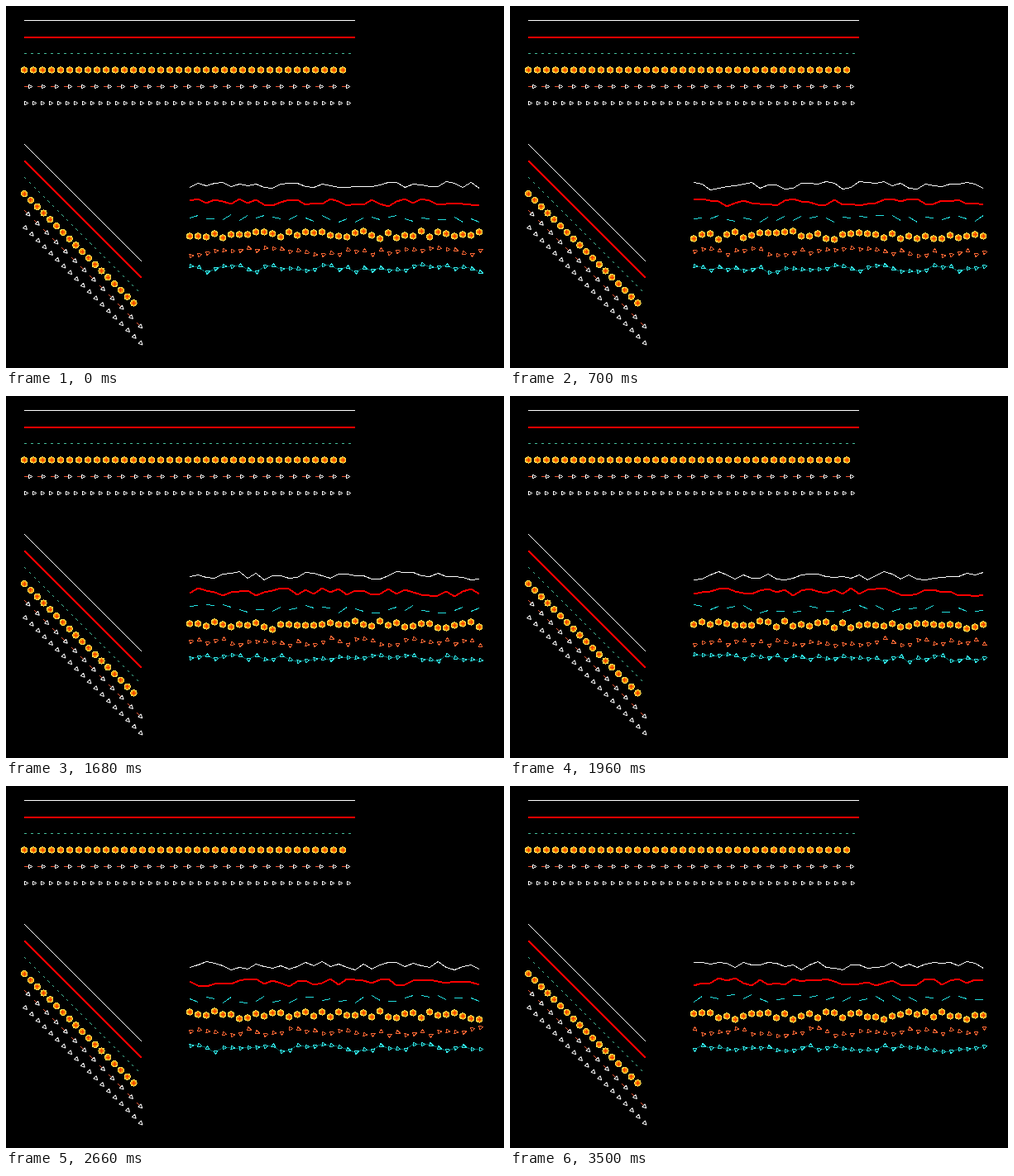
An HTML page for the animation above (3.6 s loop, 602 px wide and 438 px high).

```html
<!DOCTYPE html>
<html lang="en">
<head>
<meta charset="utf-8">
<title>Line styles</title>
<style>
  html, body { margin: 0; width: 100%; height: 100%; overflow: hidden; background: #000; }
  svg { display: block; width: 602px; height: 438px; fill: none; shape-rendering: crispEdges; stroke-linejoin: bevel; }
</style>
</head>
<body>
<svg viewBox="0 0 602 438">
  <g id="straight"></g>
  <g id="jagged"></g>
</svg>
<script>
const LOOP = 3600, TICK = 140;
const HELD = [2, 7, 11, 22];   // ticks that repeat the picture before them
const POINTS = 36, GAP = 10, SPREAD = 5, MAX_STEP = 7.5;

const range = n => Array.from({ length: n }, (_, i) => i);
const path = (d, color, width = 1, extra = '') =>
  `<path d="${d}" stroke="${color}" stroke-width="${width}" ${extra}/>`;
const polyline = points => 'M' + points.map(p => p.join()).join('L');
const dot = (x, y) =>
  `<circle cx="${x}" cy="${y}" r="3.6" fill="#f90" stroke="#fd5"/>`
  + path(`M${x - 2.5},${y}h5M${x},${y - 2.5}v5`, '#e30');
const arrow = (x, y, angle, color) =>
  path('M0,-2.4L4.6,0L0,2.4Z', color, 1, `transform="translate(${x} ${y}) rotate(${angle})"`);

// Six styles along one direction, each row 20px below the last.
function straightLines(x, y, length, angle, dots, arrowStep) {
  const a = angle * Math.PI / 180;
  const at = (row, d) => [x + d * Math.cos(a), y + 20 * row + d * Math.sin(a)];
  const line = (row, from, to) => polyline([at(row, from), at(row, to)]);
  const pairs = range(Math.floor((length - 5) / 16) + 1).map(i => i * 16);
  const arrows = range(Math.floor((length - 2) / arrowStep) + 1);
  return path(line(0, 0, length), '#fff')
    + path(line(1, 0, length), '#f00', 2)
    + path(line(2, 0, length - 4), '#4b9', 1, 'stroke-dasharray="3 5"')
    + range(dots).map(i => dot(...at(3, i * 11))).join('')
    + pairs.map(d => path(line(4, d, d + 5), '#e53')
        + arrow(...at(4, d + 5), angle, '#fff')).join('')
    + arrows.map(i => arrow(...at(5, i * arrowStep), angle, '#fff')).join('');
}

function randomFrom(seed) {
  let s = seed;
  return () => {
    s = s + 0x6D2B79F5 | 0;
    let t = Math.imul(s ^ s >>> 15, 1 | s);
    t = t + Math.imul(t ^ t >>> 7, 61 | t) ^ t;
    return ((t ^ t >>> 14) >>> 0) / 4294967296;
  };
}

// A random walk kept inside a narrow band.
function walk(row, random) {
  const base = 217 + 20 * row;
  let offset = 0;
  return range(POINTS).map(i => {
    const low = Math.max(-SPREAD, offset - MAX_STEP);
    const high = Math.min(SPREAD, offset + MAX_STEP);
    offset = low + (high - low) * random();
    return [222 + GAP * i, base + Math.round(offset)];
  });
}

function arrowsAlong(points, color) {
  return points.map(([x, y], i) => {
    const k = Math.min(i, POINTS - 2);
    const angle = Math.atan2(points[k + 1][1] - points[k][1], GAP) * 180 / Math.PI;
    return arrow(x, y, angle, color);
  }).join('');
}

function jaggedLines(tick) {
  const random = randomFrom(tick * 7919 + 17);
  const [thin, thick, dashes, dots, orange, cyan] = range(6).map(row => walk(row, random));
  const dashPath = range(POINTS / 2)
    .map(i => polyline(dashes.slice(2 * i, 2 * i + 2))).join('');
  return path(polyline(thin), '#fff')
    + path(polyline(thick), '#f00', 2)
    + path(dashPath, '#2dd')
    + dots.map(p => dot(...p)).join('')
    + arrowsAlong(orange, '#f63')
    + path(polyline(cyan), '#055')
    + arrowsAlong(cyan, '#3ee');
}

const straight = document.getElementById('straight');
const jagged = document.getElementById('jagged');
straight.innerHTML =
  straightLines(22.2, 17.5, 400, 0, 36, 10)
  + straightLines(22.2, 167.2, 200, 45, 18, 10.96);
jagged.setAttribute('transform', 'translate(.2 .5)');

let shown = -1;
function frame() {
  let tick = Math.floor(performance.now() % LOOP / TICK);
  if (HELD.includes(tick)) tick--;
  if (tick !== shown) {
    jagged.innerHTML = jaggedLines(tick);
    shown = tick;
  }
  requestAnimationFrame(frame);
}
frame();
</script>
</body>
</html>
```
